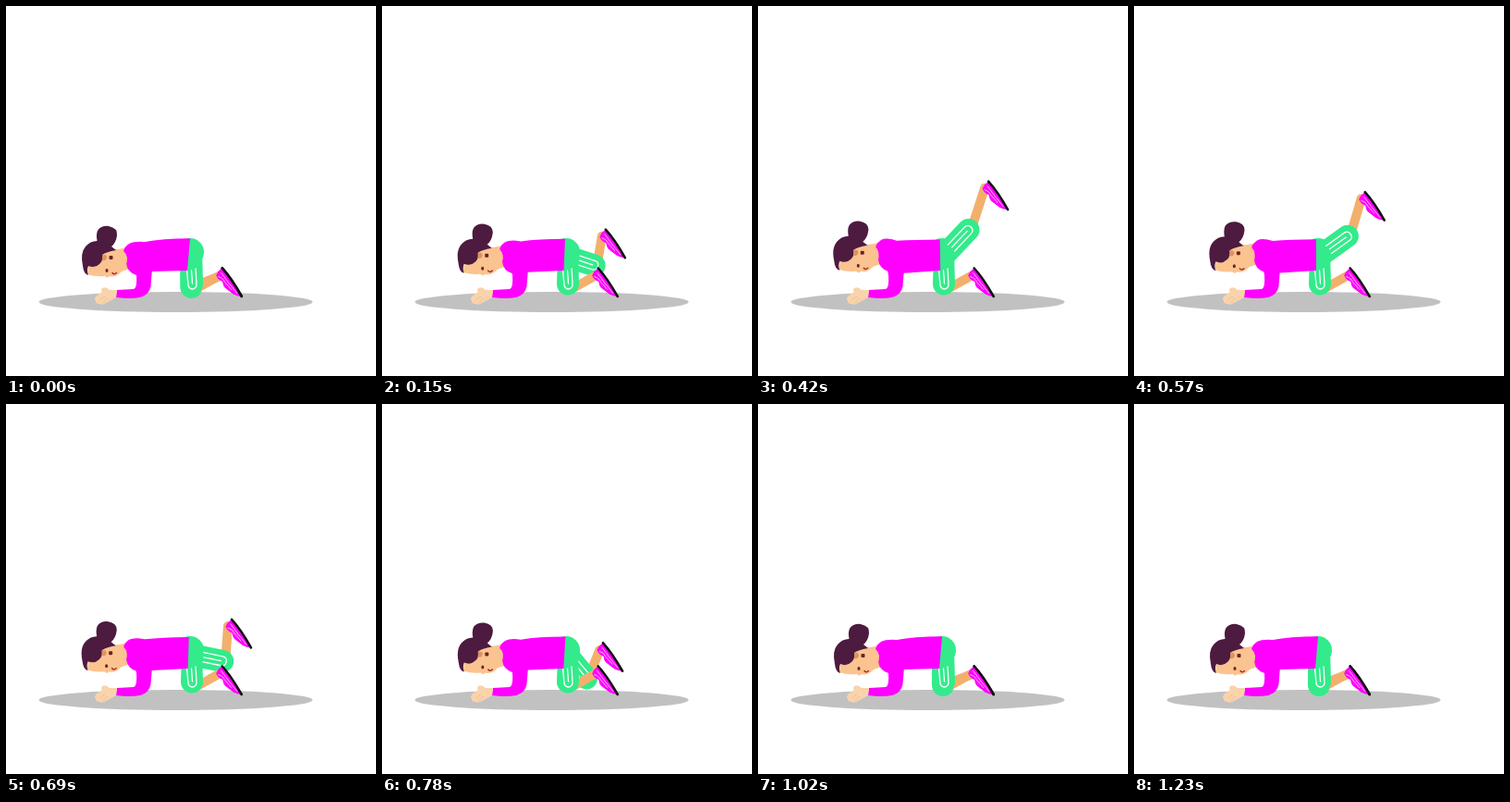
An HTML page that plays this animation: 400 px wide and 400 px high, repeating every 1260 ms.

```html
<!DOCTYPE html>
<html lang="en">
<head>
<meta charset="utf-8">
<title>Kneeling leg lift</title>
<style>
html, body { margin: 0; width: 100%; height: 100%; overflow: hidden; background: #fff; }
svg { display: block; width: 100vw; height: 100vh; }
.skin { fill: #fbc390; }
.hand { fill: #f9d3ab; }
.hair { fill: #4d1a40; }
.top { fill: #f0f; }
.pants { fill: #33eb8b; }
.limb { stroke: #33eb8b; stroke-width: 24; stroke-linecap: round; }
.shin { stroke: #f3b06c; stroke-width: 10; stroke-linecap: round; }
.trim { fill: none; stroke: #fff; stroke-width: 1.3; stroke-linecap: round; }
.sole { fill: none; stroke: #111; stroke-width: 2.6; stroke-linecap: round; }
</style>
</head>
<body>
<svg viewBox="0 0 400 400">
  <defs>
    <g id="shoe">
      <path class="top" d="M0 0 L21 30.500 Q16 30 12 28 L3 21 Q1 19 0.500 14.500 Q-4 13 -6.500 8 Q-5 3 0 0Z"/>
      <path class="trim" style="stroke-width:.7" d="M-1 5 Q6 15 16 27 M-4 9 Q1 10 3 15 L10 23"/>
      <path class="sole" d="M0 0 Q10 11 21 30.500"/>
    </g>
  </defs>

  <ellipse cx="183.500" cy="320" rx="148" ry="11" fill="#c1c1c1"/>

  <line id="shin" class="shin"/>
  <circle class="pants" cx="199" cy="266" r="15"/>
  <line id="thigh" class="limb"/>
  <path id="stripe" class="trim"/>
  <use id="foot" href="#shoe"/>

  <line class="shin" x1="205" y1="306" x2="230" y2="292"/>
  <path class="pants" d="M190 264 L189 300 A12 12 0 0 0 213 301 L212 264Z"/>
  <path class="trim" d="M195.500 286 L197 302 Q198 306 202 306 Q206 305 206 301 L205 284 M200.500 286 L201.500 300"/>
  <use href="#shoe" x="233.700" y="283.500"/>

  <path id="neck" class="skin" d="M116 264 L132 261 L134 284 L122 288Z"/>
  <path class="top" d="M139 280 L141 291 Q142 305 138 306 L120 307 L119 315 Q134 317 145 315 Q155 312 156.500 303 L158 284 L158 272Z"/>
  <path id="torso" class="top"/>

  <path class="hand" d="M120 307 L112 307 Q108 303 104 305 Q102 307 104 309 L97 314 Q95 317 97 319 Q97 322 101 322 Q104 324 108 321 L114 318 L119 315Z"/>
  <path d="M101 318 L107 314 M104 321 L110 316" fill="none" stroke="#efbd91" stroke-width=".8"/>

  <g id="head">
    <path class="skin" d="M88 290 L90 276 L104 264 L120 263 Q130 264 131 272 Q131 283 124 288 Q118 294 112 292 Q109 295 107 292 Q96 293 88 290Z"/>
    <path class="hair" d="M89 291 Q84 290 83 281 Q80 267 86 260 Q91 254 98.500 254 Q97 246 99.500 242 Q104 237 111 238 Q121 240 120 248 Q119 256 114 260 L119 264 Q108 266 104 269 Q105 276 101 279 Q96 284 89 281 Q87 286 89 291Z"/>
    <path d="M104 269 Q109 268 109 272 Q108 276 104 275Z" fill="#d99562"/>
    <rect x="111.500" y="270" width="4" height="4" rx="1" fill="#6b2520"/>
    <ellipse cx="109" cy="286" rx="1.500" ry="2" fill="#6b2520"/>
    <path d="M115 288.500 Q117 291 119.500 288.500" fill="none" stroke="#a8302c" stroke-width="1.500" stroke-linecap="round"/>
  </g>
</svg>
<script>
const LOOP = 1260;
const HIP = { x: 200, y: 271 };

// time, thigh angle, thigh length, heel x, heel y
const POSES = [
  [0, 90, 33, 233.7, 283.5],
  [150, 18, 31, 241.7, 242],
  [300, -32.5, 38, 249.7, 206],
  [440, -47, 40, 249, 189],
  [570, -36, 38, 249.7, 201],
  [780, 50, 33, 239, 258],
  [900, 90, 33, 233.7, 283.5]
];

const el = id => document.getElementById(id);
const set = (id, attrs) => {
  for (const key in attrs) el(id).setAttribute(key, attrs[key]);
};

function slope(i, k) {
  const last = POSES.length - 1;
  if (i === last) return 0;
  const a = POSES[Math.max(i - 1, 0)], b = POSES[i + 1];
  return (b[k] - a[k]) / (b[0] - a[0]);
}

// Cubic Hermite through the pose table
function poseAt(time) {
  const t = Math.min(time, 900);
  let i = 0;
  while (i < POSES.length - 2 && t >= POSES[i + 1][0]) i++;
  const a = POSES[i], b = POSES[i + 1], d = b[0] - a[0];
  const s = (t - a[0]) / d, s2 = s * s, s3 = s2 * s;
  return [1, 2, 3, 4].map(k =>
    (2 * s3 - 3 * s2 + 1) * a[k] + (3 * s2 - 2 * s3) * b[k] +
    d * ((s3 - 2 * s2 + s) * slope(i, k) + (s3 - s2) * slope(i + 1, k)));
}

function draw(time) {
  const [deg, len, fx, fy] = poseAt(time);
  const ang = deg * Math.PI / 180, c = Math.cos(ang), s = Math.sin(ang);
  const knee = { x: HIP.x + len * c, y: HIP.y + len * s };
  // Point along and across the thigh
  const at = (u, v) => `${(HIP.x + u * c - v * s).toFixed(2)} ${(HIP.y + u * s + v * c).toFixed(2)}`;

  set("thigh", { x1: HIP.x, y1: HIP.y, x2: knee.x, y2: knee.y });
  set("stripe", {
    d: `M${at(13, -5)} L${at(len - 1, -5)} Q${at(len + 4, -5)} ${at(len + 4, 0)} Q${at(len + 4, 5)} ${at(len - 1, 5)} L${at(13, 5)} M${at(14, 0)} L${at(len - 2, 0)}`
  });

  const lift = (283.5 - fy) / 80;
  const up = Math.min(lift * 2, 1);
  set("shin", {
    x1: knee.x + 3 * up, y1: knee.y,
    x2: fx - 3 - up, y2: fy + 9 - 2 * up
  });
  set("foot", { transform: `translate(${fx} ${fy})` });

  const shift = `translate(${-0.6 * lift} ${-4.5 * lift})`;
  set("head", { transform: shift });
  set("neck", { transform: shift });
  const y = v => v - 3.5 * lift;
  set("torso", {
    d: `M${199 - 2 * lift} ${251.3 + lift} Q168 ${251.5 + lift} 150 ${255 - lift} Q139 ${y(254)} 133 ${y(257)} ` +
       `Q126 ${y(262)} 127.500 ${y(267)} Q132 ${y(272)} 130 ${y(278)} Q131 ${y(288)} 141 ${y(291)} ` +
       `L158 ${287 + 1.5 * lift} L${196 + lift} 286Z`
  });
}

function tick(now) {
  draw(now % LOOP);
  requestAnimationFrame(tick);
}
draw(0);
requestAnimationFrame(tick);
</script>
</body>
</html>
```
